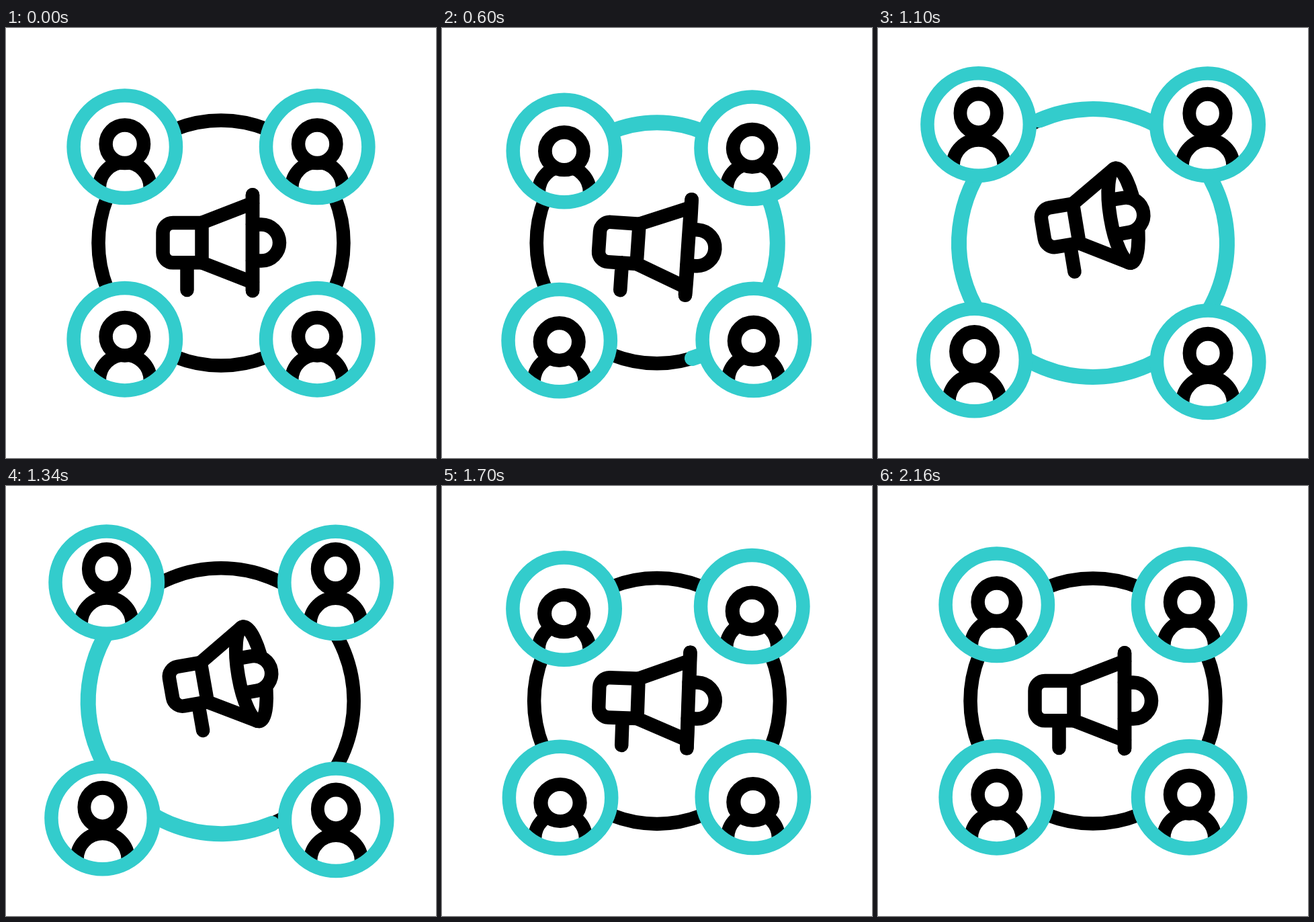
Write an HTML page with a canvas that moves like this. It is 640 by 640 pixels and loops after 2600 ms.

```html
<!DOCTYPE html>
<html lang="en">
<head>
<meta charset="utf-8">
<title>Audience reach</title>
<style>
html, body { margin: 0; width: 100%; height: 100%; overflow: hidden; background: #fff; }
canvas { display: block; width: 640px; height: 640px; }
</style>
</head>
<body>
<canvas id="stage" width="640" height="640"></canvas>
<script>
const ctx = document.getElementById('stage').getContext('2d');
const LOOP = 2600, LINE = 20.5, TEAL = '#33cccc', INK = '#000', TAU = Math.PI * 2;

function ease(t, from, to) {
  const u = Math.min(1, Math.max(0, (t - from) / (to - from)));
  return u * u * (3 - 2 * u);
}

// Smooth curve through [time, value] keys that never overshoots them.
function track(keys) {
  const slope = keys.slice(1).map(([t, v], i) => (v - keys[i][1]) / (t - keys[i][0]));
  const tangent = keys.map((_, i) => {
    const a = slope[i - 1], b = slope[i];
    return a * b > 0 ? 2 * a * b / (a + b) : 0;
  });
  return t => {
    const i = keys.findIndex(k => k[0] > t) - 1;
    if (i < 0) return 0;
    const [t0, v0] = keys[i], [t1, v1] = keys[i + 1];
    const h = t1 - t0, u = (t - t0) / h, w = 1 - u;
    return v0 * (1 + 2 * u) * w * w + h * tangent[i] * u * w * w
         + v1 * u * u * (3 - 2 * u) - h * tangent[i + 1] * u * u * w;
  };
}

// Every part winds up, bursts out, drifts to its peak of 1, recoils, rebounds and rests.
function swing(dip, burst, recoil, rebound, recoilAt, peakAt = 1290) {
  return track([[215, 0], [475, dip], [780, burst], [peakAt, 1],
    [recoilAt, recoil], [recoilAt + 260, rebound], [2170, 0]]);
}

const spread = swing(-.58, .615, -.2, .16, 1650);
const ringGrow = swing(-.6, .64, -.34, .16, 1530);
const lift = swing(-.37, .58, .03, .13, 1530);
const tilt = swing(-.78, .46, -.22, .14, 1740);
const nod = swing(-.51, .31, -.75, .25, 1740, 1460);

const live = t => ease(t, 215, 440) * (1 - ease(t, 1600, 1950));
const delayed = (t, late) => spread(t) + late * .2 * (1 - spread(t)) * live(t);

// Side signs, travel from rest and delay.
const people = [
  { sx: -1, sy: -1, dx: 29, dy: 35.5, late: 0 },
  { sx: 1, sy: -1, dx: 29, dy: 35, late: .52 },
  { sx: 1, sy: 1, dx: 29.5, dy: 35.5, late: .83 },
  { sx: -1, sy: 1, dx: 35, dy: 32.5, late: 1 }
];

function stroke(color = INK, width = LINE) {
  ctx.strokeStyle = color;
  ctx.lineWidth = width;
  ctx.stroke();
}

function fillWhite() {
  ctx.fillStyle = '#fff';
  ctx.fill();
}

function circle(x, y, r) {
  ctx.beginPath();
  ctx.arc(x, y, r, 0, TAU);
}

function drawRing(t) {
  const r = 182.5 + 18 * ringGrow(t);
  circle(320, 320, r);
  stroke();
  const from = ease(t, 1010, 1621), to = ease(t, 325, 825);
  if (to > from) {
    const start = -TAU * 3 / 8;
    ctx.beginPath();
    ctx.arc(320, 320, r, start + TAU * from, start + TAU * to);
    stroke(TEAL, 23);
  }
}

function drawPerson(p, t) {
  const move = delayed(t, p.late), bob = nod(t);
  const drop = -16.8 * bob + (p.sy > 0 ? 2.2 * (1 + bob) * live(t) : 0);
  ctx.save();
  ctx.translate(320 + p.sx * (143.2 + p.dx * move), 320 + p.sy * (143.2 + p.dy * move));
  circle(0, 0, 76.2);
  fillWhite();

  ctx.save();
  circle(0, 0, 70);
  ctx.clip();
  circle(0, 61, 38);
  stroke();
  ctx.translate(0, drop - 4);
  ctx.scale(1 + drop * .0027, 1 - drop * .002);
  circle(0, 0, 28.2);
  fillWhite();
  stroke();
  ctx.restore();

  circle(0, 0, 76.2);
  stroke(TEAL);
  ctx.restore();
}

function rim(bulge) {
  ctx.beginPath();
  ctx.ellipse(0, 0, Math.abs(bulge), 71.3, 0, -TAU / 4, TAU / 4, bulge < 0);
  stroke();
}

function drawMegaphone(t) {
  const m = 20.5 * Math.max(0, delayed(t, 1) * ease(t, 475, 700) * (1 - ease(t, 1690, 1720)));
  const half = 29.7, rimX = 75.5 - m * .22, back = -58 + m * .41;
  ctx.save();
  ctx.translate(291.5 + m * .17, 319.6 - 31 * lift(t));
  ctx.rotate(-10.4 * tilt(t) * Math.PI / 180);

  // Mouth: far rim, knob, near rim
  ctx.save();
  ctx.translate(rimX, 0);
  rim(m);
  const knobX = 13 - m * .45, knobR = 27 - m * .05;
  ctx.beginPath();
  ctx.moveTo(-m * .6, -knobR);
  ctx.arc(knobX, 0, knobR, -TAU / 4, TAU / 4);
  ctx.lineTo(-m * .6, knobR);
  fillWhite();
  stroke();
  rim(-m);
  ctx.restore();

  // Cone
  const coneY = 59 + m * .6, coneX = rimX - m * Math.sqrt(Math.max(0, 1 - (coneY / 71.3) ** 2));
  ctx.beginPath();
  ctx.moveTo(coneX, -coneY);
  ctx.lineTo(0, -half);
  ctx.lineTo(0, half);
  ctx.lineTo(coneX, coneY);
  stroke();

  // Body and handle
  ctx.beginPath();
  ctx.moveTo(0, -half);
  ctx.arcTo(back, -half, back, half, 15);
  ctx.arcTo(back, half, 0, half, 15);
  ctx.lineTo(0, half);
  ctx.moveTo(back + 36, half);
  ctx.lineTo(back + 36, 70.5);
  stroke();
  ctx.restore();
}

function draw() {
  const t = (performance.now() - begin) % LOOP;
  ctx.fillStyle = '#fff';
  ctx.fillRect(0, 0, 640, 640);
  drawRing(t);
  people.forEach(p => drawPerson(p, t));
  drawMegaphone(t);
  requestAnimationFrame(draw);
}

ctx.lineCap = ctx.lineJoin = 'round';
const begin = performance.now();
draw();
</script>
</body>
</html>
```
